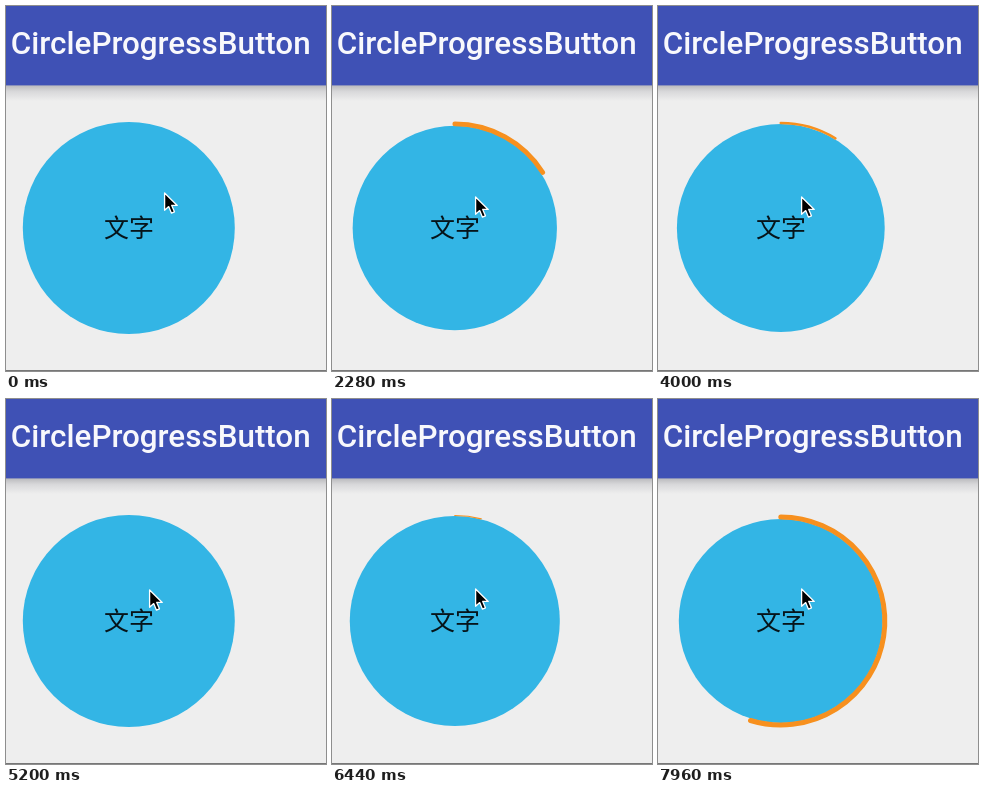
Animation, 320 px wide and 365 px high, one loop 8000 ms. Source, as an HTML page:

```html
<!DOCTYPE html>
<html lang="en">
<head>
<meta charset="utf-8">
<title>Circle progress button</title>
<style>
  html, body { margin: 0; width: 100%; height: 100%; overflow: hidden; background: #eee; }
  svg { display: block; width: 320px; height: 365px; }
  .title { font: 500 31.4px Roboto, sans-serif; fill: #f8f8fc; }
  .label { font: 500 25px "Noto Sans CJK SC", "Noto Sans CJK", sans-serif; fill: #06141a; }
</style>
</head>
<body>
<svg viewBox="0 0 320 365">
  <defs>
    <linearGradient id="shadow" x1="0" y1="0" x2="0" y2="1">
      <stop offset="0" stop-color="#b8b8bb"/>
      <stop offset=".4" stop-color="#d8d8da"/>
      <stop offset="1" stop-color="#eee"/>
    </linearGradient>
  </defs>
  <rect width="320" height="365" fill="#eee"/>
  <rect y="79" width="320" height="16" fill="url(#shadow)"/>
  <rect width="320" height="79.4" fill="#3f51b5"/>
  <text class="title" x="4.8" y="48">CircleProgressButton</text>
  <rect y="364" width="320" height="1" fill="#777"/>
  <circle id="disc" cx="122.8" cy="222" r="106" fill="#33b5e5"/>
  <path id="ring" fill="none" stroke="#f7901e" stroke-linecap="round"/>
  <text class="label" x="98" y="231" lang="zh">文字</text>
  <path id="cursor" d="M0 0V21L5 16.6L8.4 24.6L12 23L8.7 15.2H15.4Z"
        fill="#000" stroke="#fff" stroke-width="1.6" stroke-linejoin="round"/>
</svg>
<script>
const LOOP = 8000, CX = 122.8, CY = 222, RADIUS = 106;
const RING_WIDTH = 4, GROW_MS = 500, FULL_TURN_MS = 3000;
const presses = [
  { down: 1800, up: 2585 },
  { down: 3740, up: 4560 },
  { down: 6320, up: LOOP }
];
const [ring, disc, cursor] = ['ring', 'disc', 'cursor'].map(id => document.getElementById(id));
const clamp = v => Math.min(1, Math.max(0, v));
const smooth = v => v * v * (3 - 2 * v);

function point(radius, turn) {
  const a = turn * 2 * Math.PI;
  return `${CX + radius * Math.sin(a)} ${CY - radius * Math.cos(a)}`;
}

// The ring thickens while held; on release it keeps its sweep and thins out.
function buttonState(t) {
  const press = presses.findLast(p => t >= p.down);
  if (!press) return { width: 0, turn: 0 };
  const held = Math.min(t, press.up) - press.down;
  const released = Math.max(0, t - press.up);
  return {
    width: RING_WIDTH * clamp(clamp(held / GROW_MS) - released / GROW_MS),
    turn: held / FULL_TURN_MS
  };
}

function draw(t) {
  const { width, turn } = buttonState(t);
  disc.setAttribute('r', RADIUS - width);
  if (width > 0 && turn > 0) {
    const r = RADIUS - width / 2;
    ring.setAttribute('d', `M${point(r, 0)}A${r} ${r} 0 ${turn > .5 ? 1 : 0} 1 ${point(r, turn)}`);
    ring.setAttribute('stroke-width', width * 1.25);
  } else {
    ring.setAttribute('d', '');
  }
  const move = smooth(clamp(t / 800));
  const drift = smooth(clamp((t - 5300) / 700));
  cursor.setAttribute('transform',
    `translate(${158.6 - 15 * move} ${187 + 4 * move - drift}) scale(.82)`);
}

const start = performance.now();
function tick() {
  draw((performance.now() - start) % LOOP);
  requestAnimationFrame(tick);
}
tick();
</script>
</body>
</html>
```
